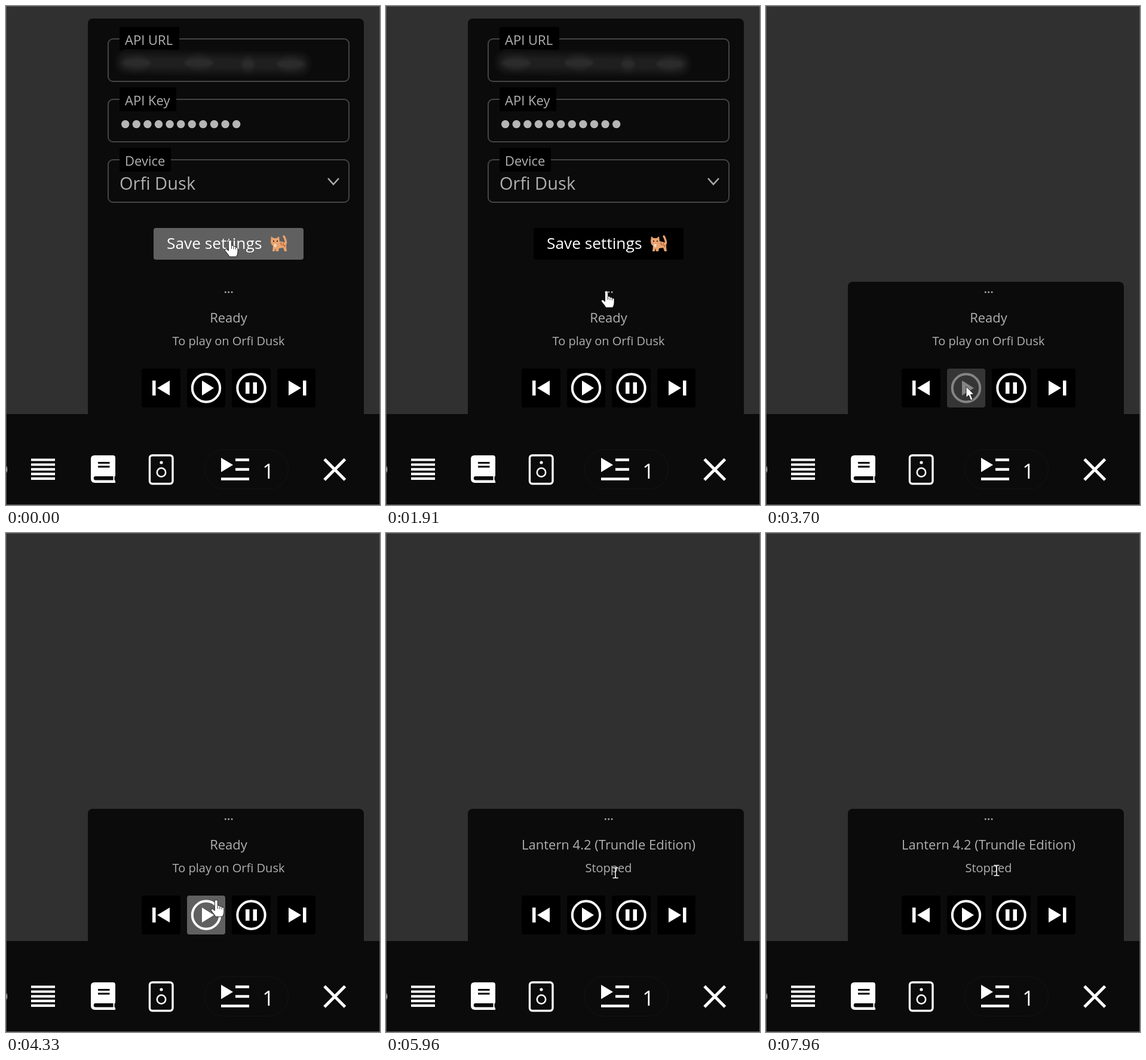
Write an HTML page that moves like this. It is 626 px wide and 834 px high and loops after 8 s.

```html
<!DOCTYPE html>
<html lang="en">
<head>
<meta charset="utf-8">
<title>Player panel</title>
<style>
  html, body { margin: 0; height: 100%; overflow: hidden; background: #303030; }
  svg { display: block; width: 100vw; height: 100vh; }
  text { font: 22px "Open Sans", "Noto Sans", sans-serif; fill: #b0b0b0; }
  .mid { text-anchor: middle; }
  .small { font-size: 20px; }
  .white { fill: #fff; }
  .line { fill: none; stroke: #fff; }
  .dark { fill: #0b0b0b; }
  .btn.hover > rect { fill: #606060; }
  .btn.busy { opacity: .5; }
</style>
</head>
<body>
<svg viewBox="0 0 626 834">
  <rect width="626" height="834" fill="#303030"/>
  <rect id="panel" class="dark" x="137" y="21" width="462" height="700" rx="8"/>

  <g id="settings">
    <g id="fields"></g>
    <g id="smudge"></g>
    <g id="dots" fill="#b5b5b5"></g>
    <text x="190" y="307" style="font-size:29px">Orfi Dusk</text>
    <path class="line" d="M539 288l9 10 9-10" style="stroke:#aaa" stroke-width="2.6"/>
    <g id="save" class="btn">
      <rect x="247" y="371" width="251" height="53" rx="4"/>
      <text class="white" x="269" y="406" style="font-size:26.3px">Save settings</text>
      <g fill="#eaa36f">
        <path d="M464 400q6-2 4-8t-3-7" fill="none" stroke="#eaa36f" stroke-width="3.4" stroke-linecap="round"/>
        <path d="M444 385l4 3h5l4-3 1 8 8 2q4 2 3 8l1 7h-4l-2-6-7 1-1 5h-4l-1-5-1 5h-4l1-9q-4-3-4-8z"/>
        <path d="M460 395l1 5m3-4v5m3-2l-1 4" stroke="#a8623c" stroke-width="1.4"/>
        <path d="M448 398h5l-1 5h-3z" fill="#f6d9bd"/>
        <path d="M447 392h2v2h-2zm6 0h2v2h-2z" fill="#3a2418"/>
      </g>
    </g>
  </g>

  <path d="M366 477h2.6v2.6h-2.6zm5.4 0h2.6v2.6h-2.6zm5.4 0h2.6v2.6h-2.6z" fill="#b0b0b0"/>
  <text id="heading" class="mid" x="372.5" y="529"></text>
  <text id="status" class="mid small" x="372.5" y="567"></text>

  <g class="btn">
    <rect x="227" y="606" width="65" height="65" rx="4"/>
    <path class="white" d="M245 626h5.500v25h-5.500zM274 626v25l-21-12.500z"/>
  </g>
  <g id="play" class="btn">
    <rect x="303" y="606" width="64" height="65" rx="4"/>
    <circle class="line" cx="335" cy="638.500" r="23.200" stroke-width="4"/>
    <path class="white" d="M328 626v25l20-12.500z"/>
  </g>
  <g class="btn">
    <rect x="378" y="606" width="65" height="65" rx="4"/>
    <circle class="line" cx="410.500" cy="638.500" r="23.200" stroke-width="4"/>
    <path class="white" d="M401 629h6.500v19h-6.500zm12.500 0h6.500v19h-6.500z"/>
  </g>
  <g class="btn">
    <rect x="454" y="606" width="64" height="65" rx="4"/>
    <path class="white" d="M473 626v25l21-12.500zM497 626h5.500v25h-5.500z"/>
  </g>

  <rect class="dark" y="682" width="626" height="152"/>
  <path class="line" d="M0 768q2.500 6.500 0 13" stroke-width="1.500"/>
  <path class="line" d="M42 758.500h40m-40 8h40m-40 7.800h40m-40 7.800h40m-40 7.800h40" stroke-width="4.200"/>
  <path class="white" d="M148 751h31q4 0 4 4v30l-1.500 2v5l1.500 2v3h-34q-7 0-7-7v-33q0-6 6-6z"/>
  <path class="dark" d="M154 762h19.500v3h-19.500zm0 6.500h19.500v3h-19.500zM150 786h29.500v6.500h-29.500a3.200 3.200 0 0 1 0-6.500z"/>
  <rect class="line" x="240.500" y="751" width="38.500" height="47.500" rx="4.500" stroke-width="3.400"/>
  <circle class="white" cx="260" cy="763" r="2.600"/>
  <circle class="line" cx="260" cy="779.500" r="7.200" stroke-width="2.600"/>
  <rect class="line" x="332.500" y="741.500" width="140" height="66" rx="33" style="stroke:#141414"/>
  <path class="white" d="M360 755v24l20-12z"/>
  <path class="line" d="M384 758.500h23m-23 16h23m-47 16h47" stroke-width="4.600"/>
  <text class="white mid" x="439" y="790" style="font-size:34px">1</text>
  <path class="line" d="M533 757.500l34.500 34.500m0-34.500l-34.500 34.500" stroke-width="5"/>
  <rect class="line" x=".5" y=".5" width="625" height="833" style="stroke:#5c5c5c"/>

  <g id="cursor">
    <path id="hand" d="M-2.500 2.500Q-2.500 0 0 0T2.500 2.500V9.500Q5 8 6 11 8.500 9.500 9.500 12.500 13 11.500 13 15V20Q13 24 10.500 28H-1Q-3 24-6 21L-8.500 17.500Q-9 14.500-6 15L-2.500 18ZM2.500 10v5M6 11.500v4M9.500 13v3" fill="#fff" stroke="#000" stroke-width=".8"/>
    <path id="arrow" d="M0 0V18.500L4.300 14.500 7.700 23 11 21.500 7.500 13.200H13Z" fill="#fff" stroke="#000" stroke-width=".8"/>
    <path id="beam" class="line" d="M-4.500-8.500H-1L0-7.500 1-8.500H4.500M0-7.500V7.500M-4.500 8.500H-1L0 7.500 1 8.500H4.500" stroke-width="1.500"/>
  </g>
</svg>
<script>
const $ = id => document.getElementById(id);
const LOOP = 8000;

$('fields').innerHTML = [['API URL', 55, 100], ['API Key', 156, 95], ['Device', 257, 86]].map(([name, y, w]) =>
  `<rect x="171" y="${y}" width="403" height="71" rx="8" fill="none" stroke="#444" stroke-width="2"/>
   <rect x="190" y="${y - 20}" width="${w}" height="40" rx="3"/>
   <text x="199" y="${y + 10}">${name}</text>`).join('');

$('dots').innerHTML = Array.from({ length: 11 }, (_, i) =>
  `<circle cx="${199.7 + 18.6 * i}" cy="197.500" r="6.700"/>`).join('');

// Soft smear: nested bands, brightest around four cores
const cores = [[219, 95, 26], [323, 95, 27], [405, 97, 14], [475, 97, 25]];
$('smudge').innerHTML = Array.from({ length: 8 }, (_, i) => {
  const level = 15 + i * 4;
  const band = i < 5
    ? `<path d="M203 94Q345 97 490 97" fill="none" stroke="rgb(${level},${level},${level})" stroke-linecap="round" stroke-width="${44 - i * 7}"/>` : '';
  return band + cores.map(([x, y, r]) =>
    `<ellipse cx="${x}" cy="${y}" rx="${r + (7 - i) * 2 - 5}" ry="${21 - i * 2.2}" fill="rgb(${level},${level},${level})"/>`).join('');
}).join('');

// Pointer moves: start, end, steps, x, y
const moves = [
  [1390, 1910, 7, 369, 476],
  [2940, 3430, 7, 335, 636],
  [4070, 4430, 5, 363, 598],
  [4680, 5080, 6, 377.5, 572],
  [5180, 5370, 3, 380, 570],
  [5960, 5960, 1, 384, 568],
  [6040, 6280, 4, 428, 582],
  [6440, 6520, 2, 438, 582],
  [7020, 7020, 1, 432, 578],
  [7260, 7500, 4, 388.5, 564],
  [7960, 7960, 1, 386, 564],
];

function pointerAt(t) {
  let x = 375, y = 391;
  for (const [start, end, steps, toX, toY] of moves) {
    if (t < start) break;
    const done = t >= end ? 1 : (Math.floor((t - start) / (end - start) * (steps - 1)) + 1) / steps;
    x += (toX - x) * done;
    y += (toY - y) * done;
  }
  return [x, y];
}

const between = (v, a, b) => v >= a && v < b;

function setButton(id, hover, busy) {
  $(id).classList.toggle('hover', hover);
  $(id).classList.toggle('busy', busy);
}

function draw(t) {
  const [x, y] = pointerAt(t);
  const open = t < 2560;
  const saving = between(t, 1210, 1390), starting = between(t, 3700, 4070);
  const onSave = open && between(y, 371, 424);
  const onPlay = between(x, 303, 367) && between(y, 606, 671);

  $('panel').setAttribute('y', open ? 21 : 461);
  $('settings').style.display = open ? '' : 'none';
  setButton('save', onSave, saving);
  setButton('play', onPlay, starting);

  const loaded = t >= 5270;
  $('heading').textContent = loaded ? 'Lantern 4.2 (Trundle Edition)' : 'Ready';
  $('status').textContent = !loaded ? 'To play on Orfi Dusk'
    : between(t, 6520, 7020) ? 'Playing' : 'Stopped';

  const overDots = between(y, 462, 500);
  const kind = between(y, 505, 592) ? 'beam'
    : !saving && !starting && (onSave || onPlay || overDots) ? 'hand' : 'arrow';
  for (const id of ['hand', 'arrow', 'beam']) $(id).style.display = id === kind ? '' : 'none';
  $('cursor').setAttribute('transform', `translate(${x} ${y})`);
}

const began = performance.now();
function tick() {
  draw((performance.now() - began) % LOOP);
  requestAnimationFrame(tick);
}
tick();
</script>
</body>
</html>
```
